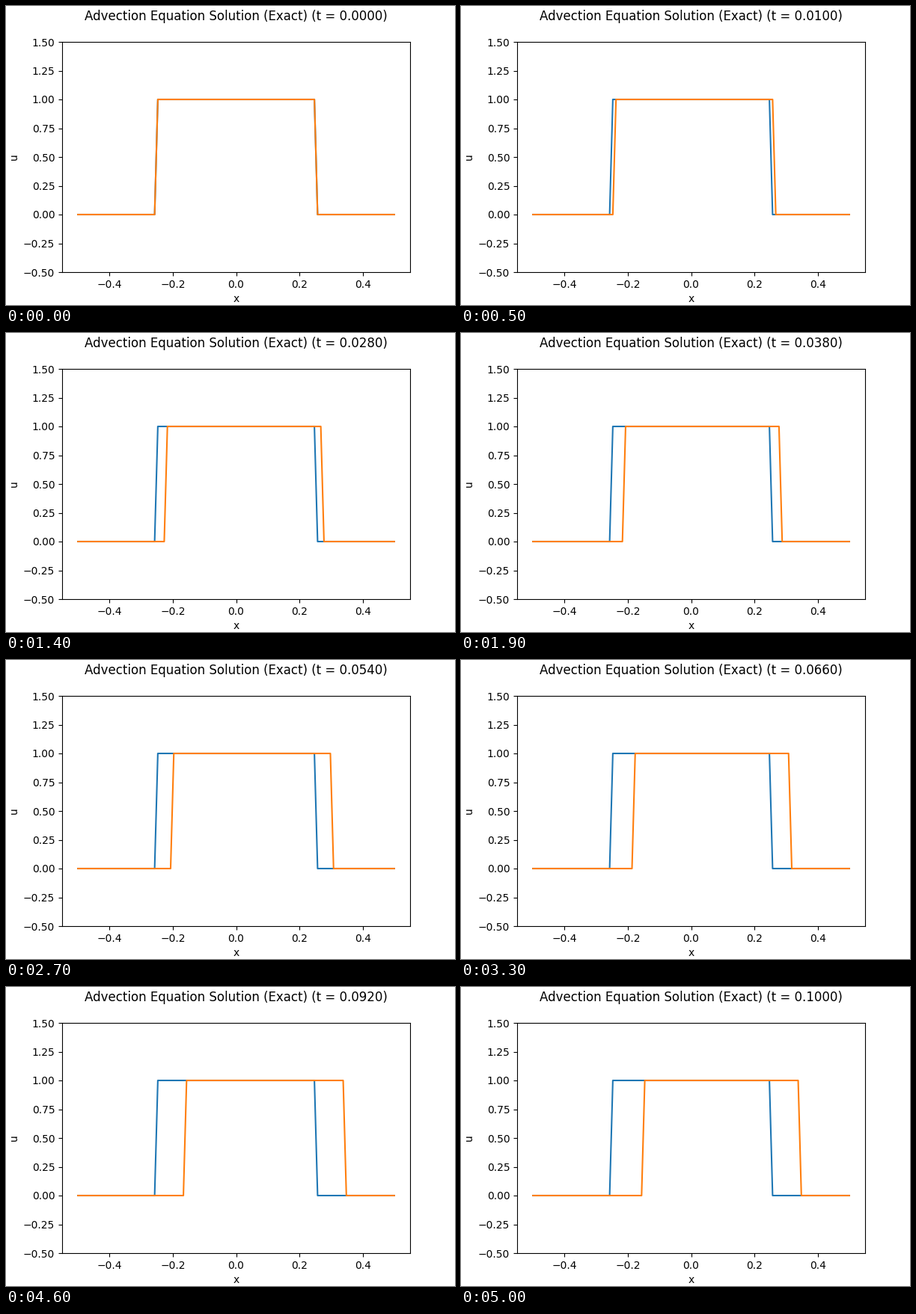
Write a matplotlib script that moves like this. It is 600 by 400 pixels and loops after 5.1 s.

```python
import matplotlib.pyplot as plt
import numpy as np
from matplotlib.animation import FuncAnimation

FRAMES = 51
INTERVAL = 100
DT = 0.002
SPEED = 1.0

x = np.linspace(-0.5, 0.5, 100)


def pulse(pos):
    """Square pulse of unit height, half a unit wide."""
    return np.where(np.abs(pos) <= 0.25, 1.0, 0.0)


fig, ax = plt.subplots(figsize=(6, 4), dpi=100)
ax.plot(x, pulse(x))
wave, = ax.plot(x, pulse(x))
ax.set_ylim(-0.5, 1.5)
ax.set_xlabel("x")
ax.set_ylabel("u")


def update(i):
    # The curve trails the displayed time by one step.
    shift = SPEED * DT * max(i - 1, 0)
    wave.set_ydata(pulse(x - shift))
    ax.set_title(f"Advection Equation Solution (Exact) (t = {i * DT:.4f})\n")
    return wave, ax.title


anim = FuncAnimation(fig, update, frames=FRAMES, interval=INTERVAL,
                     repeat=True, repeat_delay=0, blit=False)
plt.show()
```
